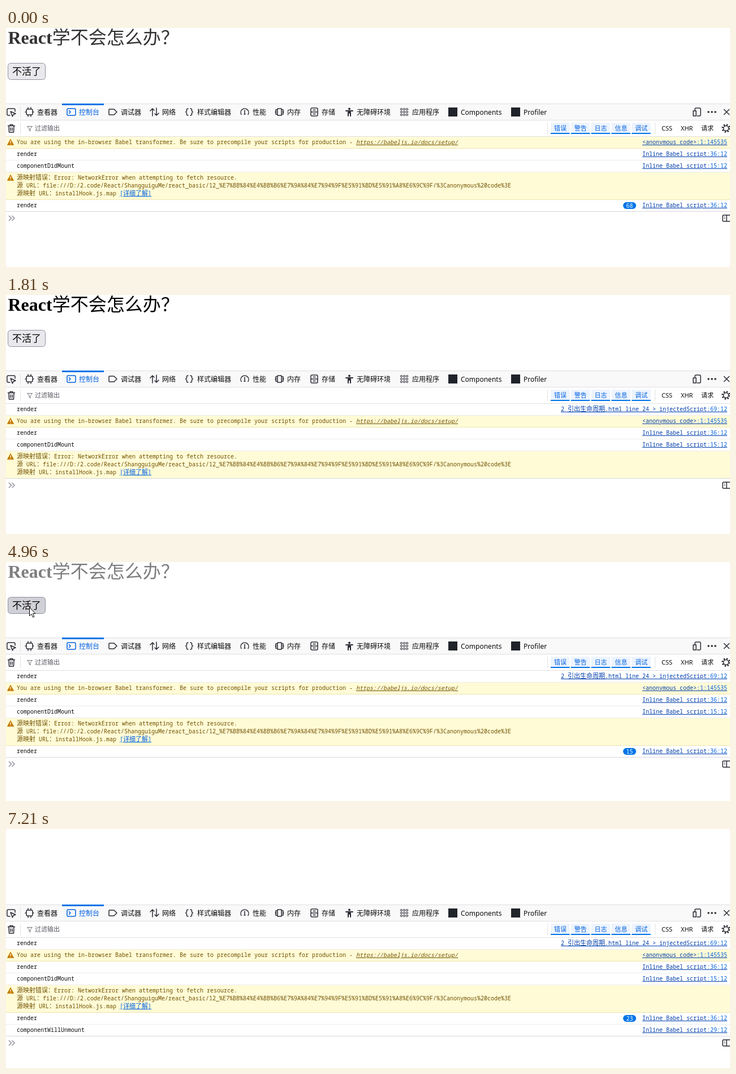
Write an HTML page that moves like this. It is 1280 px wide and 424 px high and loops after 7880 ms.

```html
<!DOCTYPE html>
<html lang="zh-CN">
<head>
<meta charset="utf-8">
<title>React lifecycle console</title>
<style>
html, body { margin: 0; width: 100%; height: 100%; overflow: hidden; background: #fff; }
svg { display: block; }
text { font: 12px "Noto Sans", "Noto Sans CJK SC", sans-serif; fill: #0c0c0d; white-space: pre; }
.title { font: bold 32px "Liberation Serif", serif; fill: #000; }
.title .cjk { font: 400 32px "Noto Sans CJK SC", sans-serif; }
.btn { font: 17px "Noto Sans CJK SC", sans-serif; fill: #000; }
.small { font-size: 11px; }
.blue { fill: #0060df; }
.mono, .link { font: 500 10px "Noto Sans Mono", monospace; }
.mono .cjk, .link .cjk { font: 11px "Noto Sans CJK SC", sans-serif; }
.warn { fill: #715100; }
.link { fill: #003eaa; text-decoration: underline; text-anchor: end; }
.url { font-style: italic; text-decoration: underline; }
.more { fill: #0060df; text-decoration: underline; }
.icons { fill: none; stroke: #2b2a33; stroke-width: 1.5; stroke-linejoin: round; stroke-linecap: round; }
.solid { fill: #2b2a33; stroke: none; }
</style>
</head>
<body>
<svg id="stage" width="1280" height="424" viewBox="0 0 1280 424"></svg>
<script>
const LOOP = 7880, RELOAD = 1490, UNMOUNT = 6380;
const wrap = s => s.replace(/[\u3000-\u9fff\uff00-\uffef]+/g, '<tspan class="cjk">$&</tspan>');
const text = (x, y, s, cls = '', extra = '') =>
  `<text x="${x}" y="${y}" class="${cls}" ${extra}>${wrap(s)}</text>`;
const rect = (x, y, w, h, fill, extra = '') =>
  `<rect x="${x}" y="${y}" width="${w}" height="${h}" fill="${fill}" ${extra}/>`;
const path = (d, extra = '') => `<path d="${d}" ${extra}/>`;
const link = (name, pos) =>
  `<text x="1275" y="13" class="link">${wrap(name)}<tspan class="blue">${pos}</tspan></text>`;

function row(id, h, body, warn) {
  const mark = warn ? path('M8 4.5L13.5 14.5H2.5Z', 'fill="#c47a00" stroke="#c47a00" stroke-linejoin="round"')
    + path('M8 7.5V11M8 12.3V13.6', 'stroke="#fff" stroke-width="1.4"') : '';
  return `<g id="${id}" data-h="${h}">${rect(0, 0, 1280, h, warn ? '#fffbd6' : '#fff')}
    ${rect(0, h - 1, 1280, 1, warn ? '#eee3b0' : '#ececf0')}${mark}${body}</g>`;
}

const H = 21, INLINE = 'Inline Babel script';
const logRow = (id, msg, pos, name = INLINE, extra = '') =>
  row(id, H, text(19, 13, msg, 'mono') + link(name, pos) + extra);

function rows() {
  const file = 'file:///D:/2.code/React/ShangguiguMe/react_basic/12_%E7%BB%84%E4%BB%B6%E7%9A%84'
    + '%E7%94%9F%E5%91%BD%E5%91%A8%E6%9C%9F/%3Canonymous%20code%3E';
  const note = 'You are using the in-browser Babel transformer. '
    + 'Be sure to precompile your scripts for production - ';
  const pill = `<g id="pill">${rect(1091, 4, 23, 12, '#0074e8', 'id="pillBox" rx="6"')}
    <text id="pillText" y="13.500" class="mono" text-anchor="middle" style="fill:#fff"></text></g>`;
  return logRow('injected', 'render', ':69:12', '2 引出生命周期.html line 24 &gt; injectedScript')
    + row('babel', H, text(19, 13, note + '<tspan class="url">https://babeljs.io/docs/setup/</tspan>', 'mono warn')
      + link('&lt;anonymous code&gt;', ':1:145535'), true)
    + logRow('first', 'render', ':36:12')
    + logRow('mount', 'componentDidMount', ':15:12')
    + row('mapError', 49,
      text(19, 13, '源映射错误：Error: NetworkError when attempting to fetch resource.', 'mono warn')
      + text(19, 27, '源 URL：' + file, 'mono warn')
      + text(19, 41, '源映射 URL：installHook.js.map <tspan class="more">[详细了解]</tspan>', 'mono warn'), true)
    + logRow('repeat', 'render', ':36:12', INLINE, pill)
    + logRow('unmount', 'componentWillUnmount', ':29:12');
}

function toolbar() {
  const tabs = [[55, '查看器'], [129, '控制台', 'blue'], [203, '调试器'], [276, '网络'], [338, '样式编辑器'],
    [436, '性能'], [497, '内存'], [558, '存储'], [620, '无障碍环境'], [718, '应用程序'],
    [804, 'Components'], [915, 'Profiler']];
  let dots = '';
  for (let i = 0; i < 9; i++)
    dots += `<circle cx="${699 + i % 3 * 5}" cy="${144 + (i / 3 | 0) * 5}" r="1.6" stroke-width="1"/>`;
  for (let i = 0; i < 3; i++) dots += `<circle class="solid" cx="${1242 + i * 6}" cy="149" r="1.8"/>`;
  const icons = [
    'M7 155H4Q2 155 2 153V145Q2 143 4 143H14Q16 143 16 145V148M8 148L17 152L13 153.5L11.5 157Z',
    'M38 144H45Q47 144 47 146V152Q47 154 45 154H38Q36 154 36 152V146Q36 144 38 144ZM39 141V144M44 141V144M39 154V157M44 154V157M34 149H36M47 149H49',
    'M183 144H191L196 149L191 154H183Q182 154 182 153V145Q182 144 183 144Z',
    'M259 156V143L255 147M259 143L262 146M266 142V155L263 152M266 155L270 151',
    'M322 143Q319.5 143 319.5 145V147.5L317.5 149L319.5 150.5V153Q319.5 155 322 155M326 143Q328.5 143 328.5 145V147.5L330.5 149L328.5 150.5V153Q328.5 155 326 155',
    'M416 153.5A7 7 0 1 1 428 153.5M422 152V146M421 153H423',
    'M480 143H487V155H480ZM480 145H477V153H480M487 145H490V153H487M476 149H478M489 149H491',
    'M541 142H549Q551 142 551 144V154Q551 156 549 156H541Q539 156 539 154V144Q539 142 541 142ZM539 149H551M543 145.5H547M543 152.5H547',
    'M1218 147V144Q1218 142 1220 142H1226Q1228 142 1228 144V154Q1228 156 1226 156H1222M1215 147H1220V156H1215Z',
    'M1269.5 144.5L1278.5 153.5M1278.5 144.5L1269.5 153.5',
    'M3.5 173.5H15.5M7 173V171.5H12V173M5 174L5.5 185H13.5L14 174M8 177V182M11 177V182'
  ].map(d => path(d)).join('');
  return rect(0, 134, 1280, 30, '#f9f9fa') + rect(0, 134, 1280, 1, '#e0e0e2')
    + rect(0, 163, 1280, 1, '#e0e0e2') + rect(25, 139, 1, 20, '#e0e0e2')
    + rect(99, 134, 74, 3, '#0074e8') + tabs.map(([x, s, c]) => text(x, 153.5, s, c)).join('')
    + rect(782, 141, 16, 16, '#20232a') + rect(893, 141, 16, 16, '#20232a')
    + `<g class="icons">${icons}${dots}
      ${path('M109 143H121Q123 143 123 145V153Q123 155 121 155H109Q108 155 108 153V145Q108 143 109 143ZM111.5 146.5L114 149L111.5 151.5', 'stroke="#0060df"')}
      <circle class="solid" cx="607" cy="143.5" r="2"/>${path('M601 147H613M607 147V151M605 156V149M609 156V149', 'stroke-width="2"')}
      <circle cx="1273" cy="178" r="4.5"/><circle cx="1273" cy="178" r="6.5" stroke-width="2.5" stroke-dasharray="2.3 2.8" stroke-linecap="butt"/></g>`;
}

function filterBar() {
  const on = ['错误', '警告', '日志', '信息', '调试'].map((s, i) => {
    const x = 963 + i * 35.8;
    return rect(x, 168, 33.5, 19, '#edf4fd') + rect(x, 186, 33.5, 2, '#0074e8') + text(x + 6, 182, s, 'small blue');
  }).join('');
  return path('M37.5 174.5H46.5L43 178.5V183L41 181.5V178.5Z', 'fill="none" stroke="#73737d"')
    + text(51, 182, '过滤输出', 'small', 'style="fill:#5b5b66"')
    + rect(25, 168, 1, 20, '#e0e0e2') + rect(957, 168, 1, 20, '#e0e0e2') + rect(1147, 168, 1, 20, '#e0e0e2')
    + on + text(1159, 182, 'CSS', 'small') + text(1193, 182, 'XHR', 'small') + text(1229, 182, '请求', 'small')
    + rect(0, 192, 1280, 1, '#e0e0e2');
}

const $ = id => document.getElementById(id);
$('stage').innerHTML = `
  <g id="title">${text(3.5, 28, 'React学不会怎么办？', 'title')}</g>
  <g id="button">${rect(3.5, 62.5, 66, 29, '#e9e9ed', 'id="face" rx="5" stroke="#8f8f9d"')}${text(11, 83, '不活了', 'btn')}</g>
  ${toolbar()}${filterBar()}${rows()}
  <g id="prompt">${rect(0, -1, 1280, 1, '#d7d7db')}
    ${path('M5 7L9.5 11.5L5 16M10.5 7L15 11.5L10.5 16', 'fill="none" stroke="#8f8f9d" stroke-width="1.5"')}
    <g class="icons">${path('M1282 6H1269Q1267 6 1267 8V15Q1267 17 1269 17H1282M1274 6V17')}${path('M1270 9H1271M1270 11.5H1271', 'stroke-width="1"')}</g></g>
  <g id="beam">${path('M-3 -7.5H-1L0 -6.5L1 -7.5H3M0 -6.5V6.5M-3 7.5H-1L0 6.5L1 7.5H3', 'fill="none" stroke="#000" stroke-width="1.3"')}</g>
  <g id="arrow">${path('M.5 .5V15.5L4 12.3L6.5 18L9 17L6.5 11.5H11Z', 'fill="#fff" stroke="#000"')}</g>`;

const show = (id, on) => $(id).style.display = on ? '' : 'none';
const move = (id, x, y) => $(id).setAttribute('transform', `translate(${x} ${y})`);
const ALL = ['injected', 'babel', 'first', 'mount', 'mapError', 'repeat', 'unmount'];

function visibleRows(t, count) {
  if (t < 1570) return ALL.slice(1, 6);
  if (t < 1650) return [];
  if (t < 1810) return ALL.slice(0, 4);
  return ALL.slice(0, t >= 6550 ? 7 : count > 0 ? 6 : 5);
}

// Number of fade ticks so far; the console lags behind the page.
function ticks(t, lag = 0) {
  if (t < RELOAD) return Math.min(75, 69 + Math.floor((t - lag * .65 - 82) / 195));
  return Math.max(0, Math.min(23, Math.floor((t - lag - 1740) / 200)));
}

// Pointer tip: time, x, y
const TRACK = [[2940, 78, 0], [3040, 71, 26], [3300, 66, 50], [3540, 58, 68], [4000, 47, 76],
  [4380, 41, 80], [6520, 41, 80], [6800, 62, 170], [7205, 120, 424]];
function pointer(t) {
  const i = TRACK.findIndex(p => p[0] > t);
  if (i < 1) return null;
  const [a, b] = [TRACK[i - 1], TRACK[i]], k = (t - a[0]) / (b[0] - a[0]);
  return [a[1] + (b[1] - a[1]) * k, a[2] + (b[2] - a[2]) * k];
}

function draw(t) {
  const gone = t >= UNMOUNT;
  const blank = t >= RELOAD && t < 1650;
  $('title').style.opacity = blank || gone ? 0 : 1 - ticks(t) % 11 / 10;
  show('button', !gone);

  const count = gone ? 23 : ticks(t, 95);
  const list = visibleRows(t, count);
  let y = 193;
  for (const id of ALL) {
    const on = list.includes(id);
    show(id, on);
    if (!on) continue;
    move(id, 0, y);
    y += +$(id).dataset.h;
  }
  move('prompt', 0, y);

  const w = 11 + 6 * String(count).length;
  show('pill', count > 1);
  $('pillBox').setAttribute('x', 1114 - w);
  $('pillBox').setAttribute('width', w);
  $('pillText').setAttribute('x', 1114 - w / 2);
  $('pillText').textContent = count;

  const p = pointer(t);
  const overTitle = p && p[1] < 40;
  show('beam', overTitle);
  show('arrow', p && !overTitle);
  if (p) move(overTitle ? 'beam' : 'arrow', ...p.map(Math.round));
  const hover = p && p[0] < 70 && p[1] > 62 && p[1] < 92;
  $('face').setAttribute('fill', !hover ? '#e9e9ed' : t > 6290 ? '#b1b1b9' : '#d0d0d7');
}

const start = performance.now();
function frame() {
  draw((performance.now() - start) % LOOP);
  requestAnimationFrame(frame);
}
frame();
</script>
</body>
</html>
```
